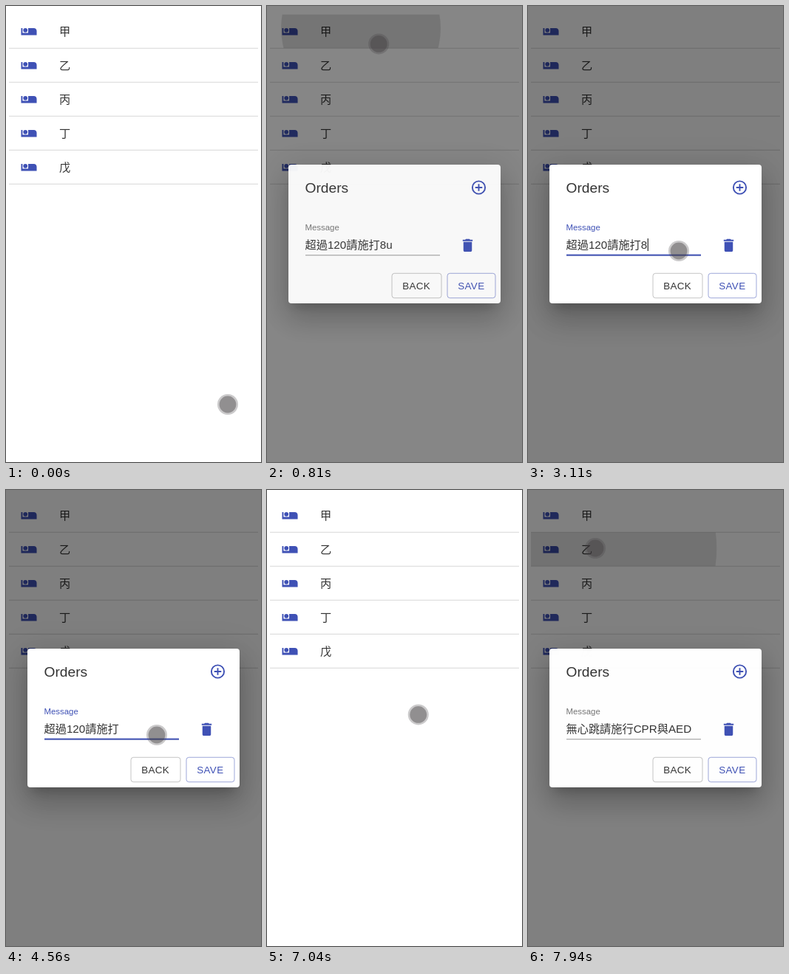
Recreate the animation shown at these times as an HTML page. Size 345 px wide and 618 px high, loop 8000 ms.

```html
<!DOCTYPE html>
<html lang="zh-Hant">
<head>
<meta charset="utf-8">
<title>Orders dialog</title>
<style>
  html, body { margin: 0; width: 100%; height: 100%; overflow: hidden; background: #fff; }
  body > * { position: absolute; left: 0; top: 0; width: 345px; height: 618px; }
  text {
    font: 300 15.2px "Liberation Sans", "Noto Sans CJK TC Light", "Noto Sans CJK TC", "Noto Sans CJK", sans-serif;
    fill: #333; white-space: pre;
  }
  .icon { fill: #3f51b5; }
  #shade { background: rgba(0, 0, 0, .5); }
  #dialog {
    left: 29px; top: 215px; width: 287px; height: 188px;
    background: #fff; border-radius: 4px;
    box-shadow: 0 10.5px 14.4px -6.7px rgba(0, 0, 0, .2),
      0 23px 36.4px 3px rgba(0, 0, 0, .14), 0 8.6px 44px 7.7px rgba(0, 0, 0, .12);
  }
  #dialog .title { font-size: 19.2px; }
  #dialog .label { font-size: 11.4px; }
  #dialog .button { font-size: 13.4px; letter-spacing: .38px; }
</style>
</head>
<body>
<svg id="list" viewBox="0 0 345 618">
  <clipPath id="row1"><rect x="4" y="11.5" width="337" height="45.5"/></clipPath>
  <clipPath id="row2"><rect x="4" y="57.5" width="337" height="45.5"/></clipPath>
  <g id="rows"></g>
  <g clip-path="url(#row1)"><circle id="ripple1" cx="127" cy="30"/></g>
  <g clip-path="url(#row2)"><circle id="ripple2" cx="90" cy="79"/></g>
</svg>
<div id="shade"></div>
<svg id="dialog" viewBox="29 215 287 188">
  <clipPath id="saveArea"><rect x="244" y="362" width="65" height="34" rx="4"/></clipPath>
  <text class="title" x="51.5" y="253">Orders</text>
  <path class="icon" transform="translate(275 234.5) scale(.958)" d="M13 7h-2v4H7v2h4v4h2v-4h4v-2h-4V7zm-1-5a10 10 0 1 0 0 20 10 10 0 0 0 0-20zm0 18a8 8 0 1 1 0-16 8 8 0 0 1 0 16z"/>
  <text class="label" id="label" x="51.5" y="304">Message</text>
  <text id="message" x="51.5" y="329.3"></text>
  <rect id="caret" y="315" width="1" height="17"/>
  <rect x="52" y="337.3" width="182" height="1" fill-opacity=".42"/>
  <rect id="underline" class="icon" y="336.6" height="2"/>
  <path class="icon" transform="translate(260 313) scale(.958)" d="M6 19c0 1.1.9 2 2 2h8c1.1 0 2-.9 2-2V7H6v12zM19 4h-3.5l-1-1h-5l-1 1H5v2h14V4z"/>
  <g fill="none">
    <rect x="169" y="362.3" width="67" height="33.4" rx="3.5" stroke="#000" stroke-opacity=".23"/>
    <rect x="244" y="362.3" width="65" height="33.4" rx="3.5" stroke="#3f51b5" stroke-opacity=".5"/>
  </g>
  <text class="button" x="183.2" y="384">BACK</text>
  <text class="button" x="258.2" y="384" style="fill:#3f51b5">SAVE</text>
  <g clip-path="url(#saveArea)"><circle id="ripple3" class="icon" cx="290" cy="393"/></g>
</svg>
<svg viewBox="0 0 345 618">
  <g id="pointer" fill="#464143">
    <circle r="14" fill-opacity=".28"/>
    <circle r="11.4" fill-opacity=".43"/>
  </g>
</svg>
<script>
const LOOP = 8000;
const FOCUS = 1730, ERASE = 3110, RETYPE = 5220, BLUR = 6840;
const KEY_GAP = 130, BLINK = 505;

const $ = id => document.getElementById(id);
const set = (id, attrs) => {
  for (const name in attrs) $(id).setAttribute(name, attrs[name]);
};

$('rows').innerHTML = [...'甲乙丙丁戊'].map((name, i) => `
  <g transform="translate(0 ${i * 46})">
    <path class="icon" transform="translate(19.5 23.2) scale(.958)" d="M7 13a3 3 0 1 0 0-6 3 3 0 0 0 0 6zm12-6h-8v7H3V7H1v10h22v-6c0-2.21-1.79-4-4-4z"/>
    <text x="72" y="39.5">${name}</text>
    <rect x="4" y="56.7" width="337" height="1.3" fill="#e0e0e0"/>
  </g>`).join('');

// cubic-bezier(x1, 0, .2, 1)
function ease(p, x1 = .4) {
  if (p <= 0) return 0;
  if (p >= 1) return 1;
  let lo = 0, hi = 1, s;
  for (let i = 0; i < 20; i++) {
    s = (lo + hi) / 2;
    const x = 3 * (1 - s) * (1 - s) * s * x1 + .6 * (1 - s) * s * s + s * s * s;
    if (x < p) lo = s; else hi = s;
  }
  return s * s * (3 - 2 * s);
}

// Each move runs from the previous stop: start, end, x, y
const moves = [
  [50, 480, 127, 27], [670, 810, 151, 51], [810, 1230, 230, 240],
  [1230, 1640, 181, 322], [1780, 1980, 204, 332],
  [6300, 6700, 290, 394], [6850, 7040, 205, 305], [7040, 7450, 91, 79]
];
function pointerAt(t) {
  let x = 300, y = 540;
  for (const [start, end, toX, toY] of moves) {
    const k = Math.min(1, Math.max(0, (t - start) / (end - start)));
    x += (toX - x) * k;
    y += (toY - y) * k;
  }
  return [x, y];
}

const keysSince = (t, start) => Math.max(0, Math.floor((t - start) / KEY_GAP) + 1);

function messageAt(t) {
  if (t > 7300) return '無心跳請施行CPR與AED';
  const dose = t < RETYPE
    ? '8u'.slice(0, Math.max(0, 2 - keysSince(t, ERASE)))
    : '10u'.slice(0, keysSince(t, RETYPE));
  return '超過120請施打' + dose;
}

// Blinking starts over with every edit
function caretOn(t) {
  const start = t < ERASE - 70 ? FOCUS : t < RETYPE + 2 * KEY_GAP ? ERASE - 70 : RETYPE + 2 * KEY_GAP;
  return t >= FOCUS && t < BLUR && Math.floor((t - start) / BLINK) % 2 === 0;
}

function ripple(id, t, press, release, radius) {
  const grow = ease((t - press) / 550);
  const fade = 1 - ease((t - release) / 550);
  set(id, { r: radius * grow, 'fill-opacity': t < press ? 0 : (.1 + .2 * grow) * fade });
}

function draw(t) {
  const open = ease((t - 650) / 225) - ease((t - 6845) / 195) + ease((t - 7745) / 225);
  $('shade').style.opacity = $('dialog').style.opacity = open;

  ripple('ripple1', t, 618, 650, 215);
  ripple('ripple2', t, 7709, 7745, 252);
  ripple('ripple3', t, 6800, 6845, 58);

  const focused = t >= FOCUS && t < BLUR;
  const half = 91 * (ease((t - FOCUS) / 200, 0) - ease((t - BLUR) / 200, 0));
  $('label').style.fill = focused ? '#3f51b5' : '#757575';
  set('underline', { x: 143 - half, width: 2 * half });

  $('message').textContent = messageAt(t);
  set('caret', {
    x: 52 + $('message').getComputedTextLength(),
    'fill-opacity': caretOn(t) ? 1 : 0
  });

  set('pointer', { transform: `translate(${pointerAt(t)})` });
}

function tick() {
  draw(performance.now() % LOOP);
  requestAnimationFrame(tick);
}
tick();
</script>
</body>
</html>
```
